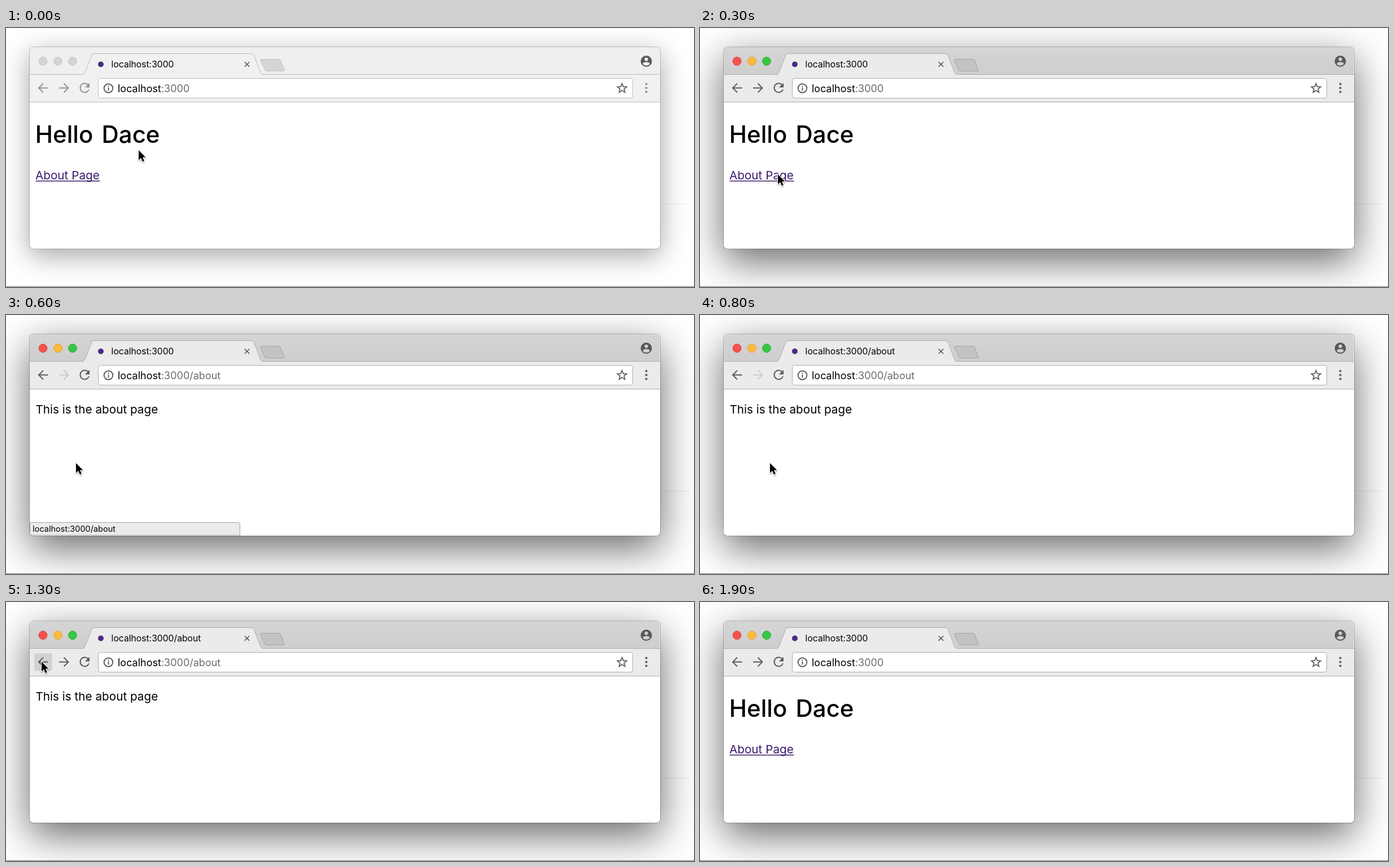
These frames come from a looping animation (1219x460 px, 2000 ms). An HTML page:

```html
<!DOCTYPE html>
<html lang="en">
<head>
<meta charset="utf-8">
<title>Browser navigation</title>
<style>
  html, body { margin: 0; width: 100%; height: 100%; overflow: hidden; background: #fff; }
  #stage { position: relative; width: 1219px; height: 460px; overflow: hidden; }
  #stage > * { position: absolute; }
  #rule { left: 1159px; top: 312px; width: 51px; height: 1px; background: rgba(0,0,0,.08); }
  #foot { left: 0; top: 459px; width: 1219px; height: 1px; background: #777; }
  #shadow {
    left: 42px; top: 34px; width: 1116.5px; height: 357.5px; border-radius: 7px;
    box-shadow: 0 0 0 1px rgba(0,0,0,.2), 0 12px 48px rgba(0,0,0,.37);
  }
  .active #shadow { box-shadow: 0 0 0 1px rgba(0,0,0,.22), 0 22px 70px rgba(0,0,0,.6); }
  svg { left: 0; top: 0; font-family: Inter, "Open Sans", sans-serif; }
  text { white-space: pre; }
  #stage { --bar: #efefef; --tool: #f1f1f1; --edge: #bababa; --nav: #929292; --new: #d5d5d5; --newEdge: #c4c4c4; }
  #stage.active { --bar: url(#barFill); --tool: #ebebeb; --edge: #acacac; --nav: #5a5a5a; --new: #c3c3c3; --newEdge: #a2a2a2; }
  .bar { fill: var(--bar); }
  .tool { fill: var(--tool); }
  .edge { stroke: var(--edge); fill: none; }
  .nav { stroke: var(--nav); }
  .dots { fill: var(--nav); }
  .line { fill: none; stroke-width: 1.9; }
  .dark { stroke: #5a5a5a; }
  .light { fill: #d4d4d4; stroke: #c6c6c6; }
  .active .red { fill: #f6524f; stroke: #dc3f3c; }
  .active .amber { fill: #fdba3c; stroke: #dfa032; }
  .active .green { fill: #37c744; stroke: #2aab35; }
  .off { stroke: #cbcbcb !important; }
</style>
</head>
<body>
<div id="stage">
  <div id="shadow"></div>
  <div id="rule"></div>
  <div id="foot"></div>
  <svg width="1219" height="460" viewBox="0 0 1219 460">
    <defs>
      <linearGradient id="barFill" x2="0" y2="1">
        <stop stop-color="#d5d5d5"/><stop offset="1" stop-color="#cecece"/>
      </linearGradient>
      <clipPath id="frame"><rect x="42" y="34" width="1116.5" height="357.5" rx="7"/></clipPath>
      <filter id="soft" x="-50%" y="-50%" width="200%" height="200%">
        <feDropShadow dx="0" dy="1.5" stdDeviation="1.3" flood-opacity=".4"/>
      </filter>
    </defs>

    <g clip-path="url(#frame)">
      <rect x="42" y="34" width="1117" height="358" fill="#fff"/>
      <rect class="bar" x="42" y="34" width="1117" height="49"/>
      <rect class="tool" x="42" y="83" width="1117" height="48"/>
      <path class="edge" d="M42 82.5H1159M42 131.5H1159"/>

      <path class="tool" d="M136 83.5Q139 82 140.5 78L151.5 49Q153 45.5 156 45.5H435Q438 45.5 439.5 49L450.5 78Q452 82 455 83.5Z"/>
      <path class="edge" d="M134 82.5Q139 82.5 140.5 78L151.5 49Q153 45.5 156 45.5H435Q438 45.5 439.5 49L450.5 78Q452 82.5 457 82.5"/>
      <path d="M453 55.5H483Q485.5 55.5 486.5 58L493 74Q494 76.5 491.5 76.5H462Q459.5 76.5 458.5 74L451 58Q450 55.5 453 55.5Z"
            style="fill:var(--new);stroke:var(--newEdge)"/>

      <circle class="light red" cx="65.5" cy="59" r="7.4"/>
      <circle class="light amber" cx="92" cy="59" r="7.4"/>
      <circle class="light green" cx="118" cy="59" r="7.4"/>

      <circle cx="168" cy="64.5" r="5" fill="#4b2a82"/>
      <text id="title" x="186.6" y="69.8" font-size="15.7"></text>
      <path class="line" stroke="#555" style="stroke-width:1.6" d="M422.7 60.2L431.3 68.8M431.3 60.2L422.7 68.8"/>

      <circle cx="1134.5" cy="59" r="10" fill="#5a5a5a"/>
      <circle class="bar" cx="1134.5" cy="55.5" r="3.1"/>
      <path class="bar" d="M1128.3 63.7Q1129 60.6 1134.5 60.6T1140.7 63.7Q1138.5 66.7 1134.5 66.7T1128.3 63.7Z"/>

      <rect id="hover" x="50" y="91" width="31.5" height="31.5" rx="3" fill="#d2d2d2"/>
      <path class="line nav" d="M74.5 106.5H58.5M66 98.5L58 106.5L66 114.5"/>
      <path id="forward" class="line nav" d="M94 106.5H110M102.5 98.5L110.5 106.5L102.5 114.5"/>
      <path class="line nav" d="M145.5 101A8 8 0 1 0 147 109"/>
      <path class="dots" d="M148 97.5V105.5H140Z"/>

      <rect x="163.5" y="89.5" width="947" height="35" rx="4" fill="#fff" style="stroke:var(--edge)"/>
      <circle class="line dark" cx="181.5" cy="107" r="7.8"/>
      <path class="line dark" d="M181.5 105.8V111.2M181.5 102.4V104.4"/>
      <text x="198" y="113.5" font-size="18">localhost<tspan id="url" fill="#6b6b6b"></tspan></text>
      <path id="star" class="line dark" style="stroke-width:1.7"/>
      <g class="dots">
        <circle cx="1134.5" cy="99.5" r="2.1"/>
        <circle cx="1134.5" cy="106.5" r="2.1"/>
        <circle cx="1134.5" cy="113.5" r="2.1"/>
      </g>

      <g id="home">
        <text x="51.8" y="204" font-size="42" font-weight="500" word-spacing="4">Hello Dace</text>
        <text x="52" y="269.2" font-size="20.7">About Page</text>
        <path d="M52.5 271.8H166.5" stroke-width="1.5"/>
      </g>
      <text id="about" x="52.5" y="175" font-size="20.7">This is the about page</text>

      <g id="status">
        <path d="M42.5 368.5H411Q414.5 368.5 414.5 372V391H42.5Z" fill="#ebebeb" stroke="#a3a3a3"/>
        <text x="47.2" y="385.2" font-size="14.5">localhost:3000/about</text>
      </g>
    </g>

    <g id="cursor" filter="url(#soft)">
      <path transform="scale(1.03)" d="M0 0V17L4 13.3L6.8 19.6L9.6 18.4L6.9 12.2H12Z"
            stroke="#fff" stroke-width="2" paint-order="stroke" stroke-linejoin="round"/>
    </g>
  </svg>
</div>
<style>
  #home text + text { fill: #3b1a6e; }
  #home path { stroke: #3b1a6e; }
</style>
<script>
  const LOOP = 2000;
  const $ = id => document.getElementById(id);

  // Each key changes only what it names; the rest carries over.
  const keys = [
    { t: 0, x: 235, y: 217, active: false, page: "home", title: "", status: 0, hover: false, forward: true, cursor: true },
    { t: 100, x: 178, y: 246 },
    { t: 200, x: 138, y: 260 },
    { t: 300, active: true },
    { t: 400, x: 134, y: 261, status: 1 },
    { t: 500, x: 127, y: 263 },
    { t: 600, x: 124, y: 263, page: "about", forward: false },
    { t: 700, title: "/about", status: 0.5 },
    { t: 800, status: 0 },
    { t: 900, x: 119, y: 247 },
    { t: 1000, x: 99, y: 190 },
    { t: 1100, x: 74, y: 132 },
    { t: 1200, x: 63, y: 106, hover: true },
    { t: 1300, forward: true },
    { t: 1400, page: "home" },
    { t: 1500, title: "" },
    { t: 1600, x: 66, y: 113 },
    { t: 1700, x: 82, y: 150, hover: false },
    { t: 1800, cursor: false }
  ];

  const show = (id, on) => { $(id).style.opacity = Number(on); };

  function starPath(cx, cy, outer, inner) {
    const points = Array.from({ length: 10 }, (_, i) => {
      const r = i % 2 ? inner : outer;
      const a = (i * Math.PI) / 5 - Math.PI / 2;
      return `${cx + r * Math.cos(a)} ${cy + r * Math.sin(a)}`;
    });
    return `M${points.join("L")}Z`;
  }

  function draw(time) {
    const s = Object.assign({}, ...keys.filter(k => k.t <= time));
    $("stage").classList.toggle("active", s.active);
    $("title").textContent = "localhost:3000" + s.title;
    $("url").textContent = ":3000" + (s.page === "about" ? "/about" : "");
    $("forward").classList.toggle("off", !s.forward);
    show("home", s.page === "home");
    show("about", s.page === "about");
    show("status", s.status);
    show("hover", s.hover);
    show("cursor", s.cursor);
    $("cursor").setAttribute("transform", `translate(${s.x} ${s.y})`);
  }

  $("star").setAttribute("d", starPath(1091.5, 107.2, 8.7, 3.8));
  const start = performance.now();
  function tick(now) {
    draw(Math.max(0, now - start) % LOOP);
    requestAnimationFrame(tick);
  }
  draw(0);
  requestAnimationFrame(tick);
</script>
</body>
</html>
```
